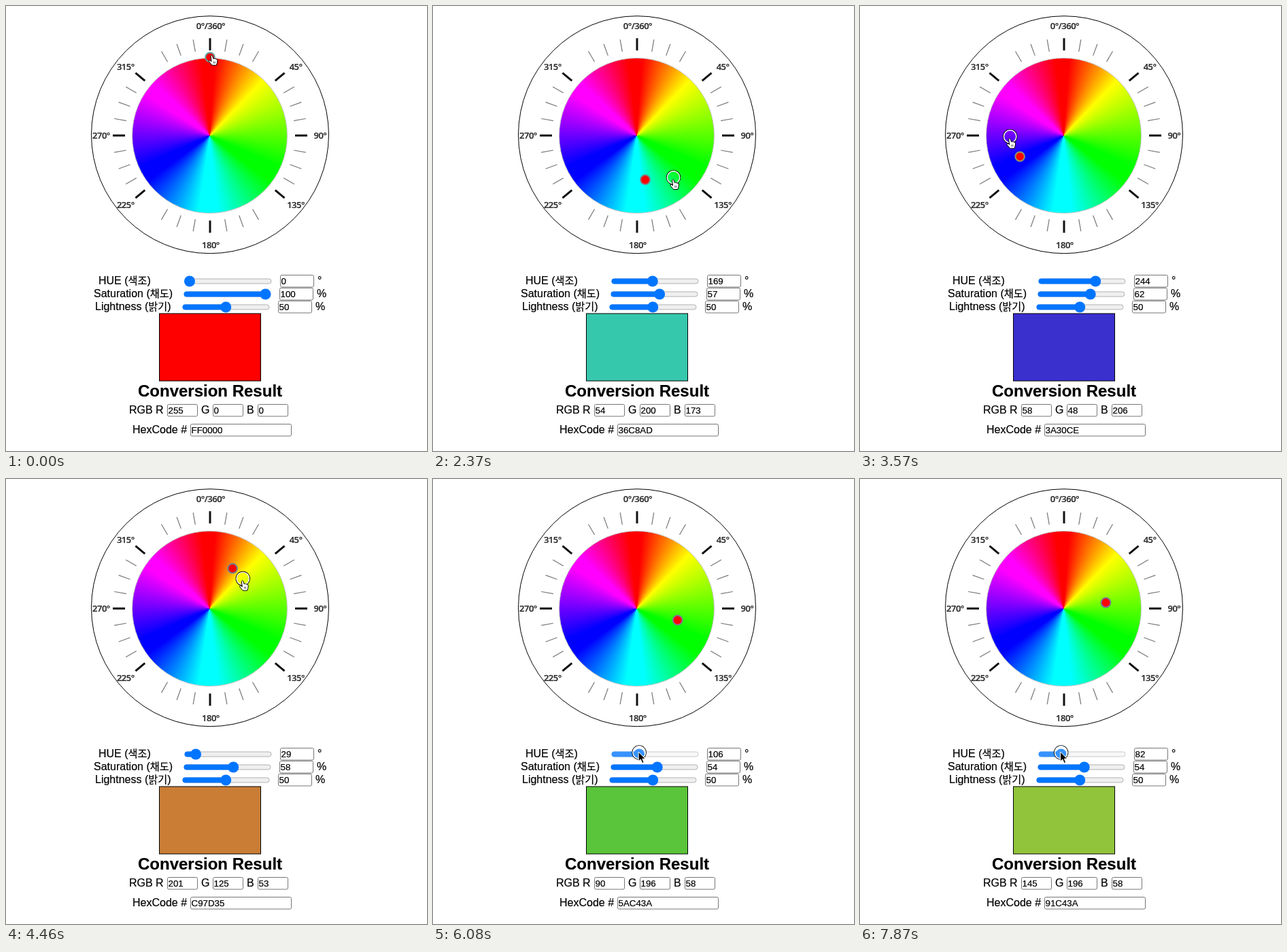
An HTML page that plays this animation: 619x654 px, repeating every 8 s.

```html
<!DOCTYPE html>
<html lang="en">
<head>
<meta charset="utf-8">
<title>HSL colour wheel</title>
<style>
  html, body { margin: 0; width: 100%; height: 100%; overflow: hidden; background: #fff; }
  #wheel {
    position: absolute; left: 185px; top: 76px; width: 229px; height: 229px;
    box-sizing: border-box; border: 1px solid #c4c4c4; border-radius: 50%;
    background: conic-gradient(red 4deg, yellow 44deg, lime 114deg 127deg, cyan 174deg 188deg,
      blue 234deg 246deg, magenta 303deg 313deg, red 354deg) border-box;
  }
  svg { position: absolute; left: 0; top: 0; display: block; }
  text {
    font: 16px "Liberation Sans", Arial, sans-serif; white-space: pre;
    stroke: #000; stroke-width: .2px;
  }
  .ko { font: 15.2px "Noto Sans CJK KR", "Noto Sans CJK", sans-serif; }
  .value { font-size: 13.33px; }
  .title { font-size: 24px; font-weight: bold; }
  .degree { font: 600 13px "Open Sans", sans-serif; letter-spacing: -.5px; fill: #333; text-anchor: middle; }
</style>
</head>
<body>
<div id="wheel"></div>
<svg id="stage" width="619" height="654" viewBox="0 0 619 654"></svg>
<script>
const LOOP = 8000, STEP = 148.1, LAST = 53;
const CX = 300, CY = 190.3, REACH = 115;
const PRESS = 4, RELEASE = 33, GRAB = 39, TURN = 47;
const stage = document.getElementById('stage');

function set(el, attrs) {
  for (const name in attrs) el.setAttribute(name, attrs[name]);
}
function add(tag, attrs, content = '') {
  const el = document.createElementNS('http://www.w3.org/2000/svg', tag);
  set(el, attrs);
  el.innerHTML = content;
  return stage.appendChild(el);
}
function label(x, y, content, cls = '') {
  return add('text', { x, y, class: cls }, content);
}
function polar(angle, radius) {
  const a = angle * Math.PI / 180;
  return [CX + radius * Math.sin(a), CY - radius * Math.cos(a)];
}
function ease(from, to, start, end, step) {
  const p = Math.max(0, Math.min(1, (step - start) / (end - start)));
  return from + (to - from) * (1 - Math.cos(Math.PI * p)) / 2;
}
// Smooth curve through keys [step, a, b]
function spline(keys, step) {
  const last = keys.length - 1;
  if (step >= keys[last][0]) return keys[last].slice(1);
  const i = keys.findIndex(key => key[0] > step) - 1;
  const slope = (k, c) => k === 0 || k === last ? 0
    : (keys[k + 1][c] - keys[k - 1][c]) / (keys[k + 1][0] - keys[k - 1][0]);
  const span = keys[i + 1][0] - keys[i][0], u = (step - keys[i][0]) / span;
  return [1, 2].map(c => {
    const from = keys[i][c], to = keys[i + 1][c];
    return from + (to - from) * u * u * (3 - 2 * u)
      + span * u * (1 - u) * (slope(i, c) * (1 - u) - slope(i + 1, c) * u);
  });
}

// Dial: majors sit at the eighths, the diagonals spread to 50 degrees
add('circle', { cx: 300, cy: 189.2, r: 174.5, fill: 'none', stroke: '#000' });
for (let a = 0; a < 360; a += 10) {
  const fold = Math.min(a % 180, 180 - a % 180);
  if (fold === 40) continue;
  const major = fold === 0 || fold === 50 || fold === 90;
  const [x1, y1] = polar(a, 125), [x2, y2] = polar(a, 143);
  add('line', { x1, y1, x2, y2, stroke: major ? '#111' : '#777', 'stroke-width': major ? 3 : 1.2 });
}
for (let i = 0; i < 8; i++) {
  const spread = i % 2 ? (i % 4 === 1 ? 6 : -6) : 0;
  const [x, y] = polar(i * 45 + spread, 161);
  label(x + 1, y + 5, i ? `${i * 45}°` : '0°/360°', 'degree');
}

// Form
function field(x, y, width) {
  add('rect', { x: x + .5, y: y + .5, width: width - 1, height: 17.5, rx: 2, fill: '#fff', stroke: '#767676' });
  return label(x + 1.5, y + 14, '', 'value');
}
function slider(x, cy) {
  const back = add('rect', { x: x + .5, y: cy - 3.5, width: 127, height: 7, rx: 3.5 });
  const fill = add('rect', { x, y: cy - 4, height: 8, rx: 4 });
  const thumb = add('circle', { cy, r: 8 });
  const looks = {
    idle: ['#0075ff', '#efefef', '#b2b2b2'],
    hover: ['#005cc8', '#e5e5e5', '#a0a0a0'],
    active: ['#3793ff', '#f8f8f8', '#cbcbcb']
  };
  return (part, state = 'idle') => {
    const at = x + 7.5 + part * 112.5, [main, bg, edge] = looks[state];
    set(back, { fill: bg, stroke: edge });
    set(fill, { width: at - x, fill: main });
    set(thumb, { cx: at, fill: state === 'active' ? main : looks.idle[0] });
    return at;
  };
}
const [hueRow, satRow, lightRow] = [
  ['HUE', '색조', 136, 403, '°'],
  ['Saturation', '채도', 129, 402, '%'],
  ['Lightness', '밝기', 131, 400, '%']
].map(([name, word, x, fieldX, unit], i) => {
  const top = 395 + 19 * i;
  label(x, top + 14, `${name} (<tspan class="ko">${word}</tspan>)`);
  label(fieldX + 55, top + 14, unit);
  return { slide: slider(fieldX - 140.5, top + 9.5), text: field(fieldX, top, 50) };
});
lightRow.slide(.5);
lightRow.text.textContent = 50;

const swatch = add('rect', { x: 225.5, y: 452, width: 149, height: 99, stroke: '#000' });
label(194, 573.5, 'Conversion Result', 'title');
const rgbFields = [['RGB R', 181, 237], ['G', 287, 304], ['B', 354, 370]].map(([name, x, fieldX]) => {
  label(x, 599, name);
  return field(fieldX, 585, 45);
});
label(186, 628, 'HexCode #');
const hexField = field(271, 614, 149);

// Picker and pointers
const ball = add('circle', { r: 6.8, fill: '#f00', 'stroke-width': 2 });
const ring = add('g', { fill: 'none' }, `<circle r="10.2" stroke="#000" stroke-width="1.1"/>
  <circle r="9.2" stroke="#fff" stroke-width="1.4"/>`);
const hand = add('g', { stroke: '#000' }, `<path fill="#fff" stroke-linejoin="round" d="M-2 4
  Q-.8 1.6 .6 4L1.8 8Q3.2 6.4 4.2 8.2Q5.8 7 6.4 9Q8 8.4 8 10.4L7.4 14.2L6.4 17.6H0
  L-4.4 12.4Q-5.4 10.4-3.4 10.2L-1 12Z"/><path stroke-width=".7" d="M2.2 12v3M4.2 12v3"/>`);
const arrow = add('path', { stroke: '#fff', 'stroke-linejoin': 'round',
  d: 'M-1-1V13L2.2 10L4.6 15.6L7 14.6L4.7 9.2H9Z' });

// Drag over the wheel as [step, hue, saturation]; free moves as [step, x, y]
const wheelDrag = [
  [PRESS, 360, 100], [9, 348, 50], [10, 342, 57], [16, 169.5, 57.5], [17, 139, 71],
  [19, 112, 70], [24, 244.5, 62.5], [25, 269, 69], [RELEASE, 424.5, 54.9]
];
const approach = [[0, 303, 69.5], [2, 300, 73]];
const travel = [[RELEASE, 356, 163], [36, 284, 424], [37, 285, 411], [38, 290, 403]];

function colourAt(step) {
  if (step < GRAB) return spline(wheelDrag, Math.max(step, PRESS));
  const hue = step <= TURN ? ease(64, 352, GRAB, TURN, step) : ease(352, 82, TURN + 1, LAST, step);
  return [Math.round(hue), 54];
}
function hslToRgb(h, s) {
  return [0, 8, 4].map(shift => {
    const k = (shift + h / 30) % 12;
    const v = .5 - s / 200 * Math.max(-1, Math.min(k - 3, 9 - k, 1));
    return Math.floor(v * 255 + 1e-6);
  });
}
function place(el, x, y, shown) {
  set(el, { transform: `translate(${x} ${y})`, visibility: shown ? 'visible' : 'hidden' });
}

function draw(step) {
  const [angle, amount] = colourAt(step);
  const hue = Math.floor(angle) % 360, sat = Math.floor(amount);
  const rgb = hslToRgb(hue, sat);
  const onWheel = step >= PRESS && step < RELEASE, onSlider = step >= GRAB;

  // The picker trails the pointer by one step while dragged on the wheel.
  let x, y = 402;
  if (onWheel) {
    const [ahead, reach] = colourAt(step + 1);
    [x, y] = polar(ahead, reach / 100 * REACH);
  } else if (!onSlider) [x, y] = spline(step < PRESS ? approach : travel, step);

  const overHue = Math.abs(y - 403) < 4, overSat = Math.abs(y - 418) < 8;
  const thumbX = hueRow.slide(hue / 360, onSlider ? 'active' : overHue ? 'hover' : 'idle');
  satRow.slide(sat / 100, overSat ? 'hover' : 'idle');
  if (onSlider) x = thumbX;

  hueRow.text.textContent = hue;
  satRow.text.textContent = sat;
  rgbFields.forEach((el, i) => el.textContent = rgb[i]);
  hexField.textContent = rgb.map(v => v.toString(16).padStart(2, '0')).join('').toUpperCase();
  swatch.setAttribute('fill', `rgb(${rgb})`);

  const [cx, cy] = polar(angle, amount / 100 * REACH);
  const rim = rgb.map(v => Math.round(96 + (255 - v) * .25));
  set(ball, { cx, cy, stroke: `rgb(${rim})` });
  place(ring, x, y, onWheel || onSlider);
  place(hand, x, y, step <= RELEASE);
  place(arrow, x, y, step > RELEASE);
}

function tick(now) {
  draw(Math.min(LAST, Math.floor(now % LOOP / STEP)));
  requestAnimationFrame(tick);
}
draw(0);
requestAnimationFrame(tick);
</script>
</body>
</html>
```
